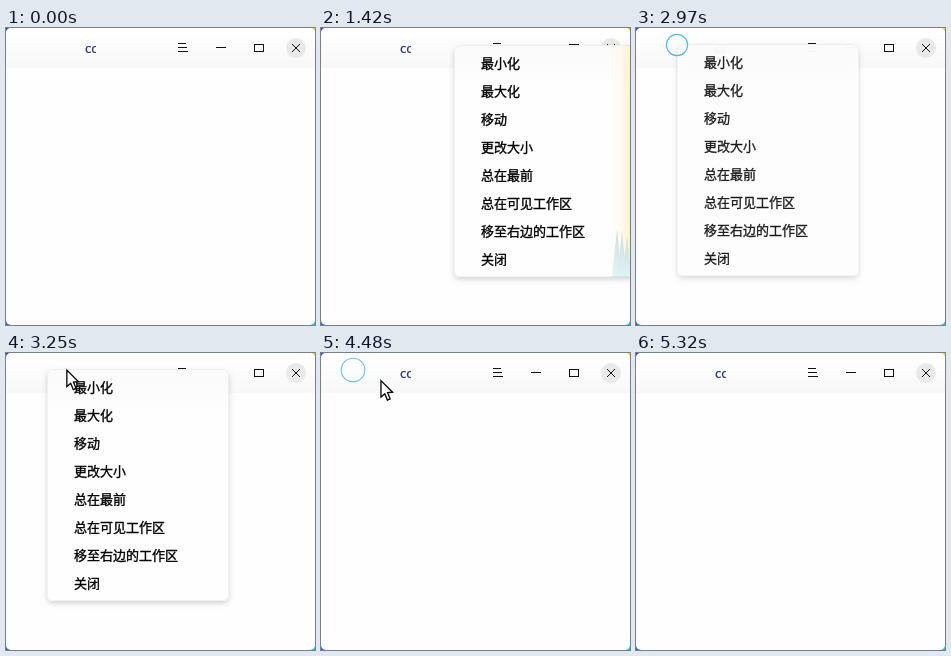
An HTML page with a canvas that plays this animation: 309x297 px, repeating every 6.52 s.

```html
<!DOCTYPE html>
<html lang="zh-CN">
<head>
<meta charset="utf-8">
<title>Window menu</title>
<style>
html, body { margin: 0; width: 100%; height: 100%; overflow: hidden; background: #fff; }
canvas { display: block; width: 309px; height: 297px; }
</style>
</head>
<body>
<canvas id="stage" width="309" height="297"></canvas>
<script>
const W = 309, H = 297, LOOP = 6520;
const BAR = 40, ROW = 28;
const FADE = 200;
const g = document.getElementById('stage').getContext('2d');
const ITEMS = ['最小化', '最大化', '移动', '更改大小', '总在最前', '总在可见工作区', '移至右边的工作区', '关闭'];

// Each tap sends out a ring; one opens the menu, the next closes it.
const tap = (x, time, life) => ({ x, y: 17, time, life });
const SHOWS = [
  { x: 133, y: 17, open: tap(133, 1090, 330), close: tap(115, 1860, 380) },
  { x: 41, y: 16, open: tap(41, 2800, 360), close: tap(32, 4030, 690) }
];

// Key places of the pointer tip
const at = (time, x, y) => ({ time, x, y });
const PATH = [
  at(3130, 78, 17.5), at(3720, 31.5, 16.5), at(4240, 31.5, 16.5), at(4480, 59.5, 27.5),
  at(4880, 155, 55), at(5120, 155, 55), at(5320, 290, 233)
];

const mix = (a, b, p) => a + (b - a) * p;
const span = (t, a, b) => Math.max(0, Math.min(1, (t - a) / (b - a)));
const easeOut = (p, n = 2) => 1 - (1 - p) ** n;

function fade(x0, y0, x1, y1, ...stops) {
  const f = g.createLinearGradient(x0, y0, x1, y1);
  stops.forEach((c, i) => f.addColorStop(i / (stops.length - 1), c));
  return f;
}

function fillRect(x, y, w, h, color) {
  g.fillStyle = color;
  g.fillRect(x, y, w, h);
}

function box(x, y, w, h, r) {
  g.beginPath();
  g.roundRect(x, y, w, h, r);
}

function circle(x, y, r) {
  g.beginPath();
  g.arc(x, y, r, 0, 2 * Math.PI);
}

// A thin stroke gives the text its medium weight.
function label(text, x, y, color, weight) {
  g.fillStyle = g.strokeStyle = color;
  g.lineWidth = weight;
  g.fillText(text, x, y);
  g.strokeText(text, x, y);
}

function drawDesktop() {
  fillRect(0, 0, W / 2, H, fade(0, 0, 0, H, '#3c4cae', '#2f6fc8'));
  fillRect(W / 2, 0, W / 2, H, fade(0, 0, 0, H, '#f2d81c', '#30c0c4'));
}

function drawIcons() {
  const cy = 20, arm = 4;
  fillRect(210, cy - 1, 10, 1, '#111');
  for (let i = 0; i < 3; i++) fillRect(172, cy - 5 + i * 4, 8 + i, 1, '#111');

  g.fillStyle = '#e9e9e9';
  circle(290, cy, 10);
  g.fill();

  g.strokeStyle = '#111';
  g.lineWidth = 1;
  g.strokeRect(248.5, cy - 3.5, 9, 7);
  g.beginPath();
  for (const s of [-1, 1]) {
    g.moveTo(290 - arm, cy - arm * s);
    g.lineTo(290 + arm, cy + arm * s);
  }
  g.stroke();
}

function drawWindow() {
  g.save();
  box(0, 0, W, H, 5);
  g.clip();
  fillRect(0, 0, W, H, '#fefefe');
  fillRect(0, 0, W, BAR, fade(0, 0, 0, BAR, '#ffffff', '#f8f8f8'));
  g.beginPath();
  g.rect(78, 0, 12, BAR);
  g.clip();
  g.font = '13px "Noto Sans", sans-serif';
  label('co', 79, 25, '#28346c', .2);
  g.restore();
  drawIcons();
}

// Blurred wallpaper showing through past the window edge
function drawGlow(bottom) {
  const shore = 206, left = 288;
  fillRect(left, 0, W - left, bottom,
    fade(left, 0, W, 0, 'rgba(255,246,214,0)', 'rgba(254,247,222,.35)', 'rgba(255,240,192,.85)'));
  for (let x = 294; x < W; x += 5) {
    const peak = shore + 5 * Math.sin(x);
    g.fillStyle = fade(0, peak, 0, bottom, 'rgba(196,214,220,.75)', 'rgba(220,244,246,.9)');
    g.beginPath();
    g.moveTo(x - 3, bottom);
    g.lineTo(x + 2, peak);
    g.lineTo(x + 7, bottom);
    g.fill();
  }
}

function drawMenu({ x, y, open, close }, t) {
  const start = open.time + 50, end = close.time + 60;
  const alpha = easeOut(span(t, start, start + FADE)) * (1 - span(t, end, end + FADE));
  if (!alpha) return;
  const w = 182, h = ITEMS.length * ROW + 8;
  g.save();
  g.globalAlpha = alpha;

  g.save();
  g.shadowColor = 'rgba(0,0,0,.16)';
  g.shadowBlur = 5;
  g.shadowOffsetY = 2.5;
  g.fillStyle = '#fff';
  box(x, y, w, h, 6);
  g.fill();
  g.restore();

  g.save();
  box(x, y, w, h, 6);
  g.clip();
  fillRect(x, y, w, h, fade(0, y, 0, y + BAR, '#fafafa', '#fefefe'));
  if (x + w > W) drawGlow(y + h);
  g.restore();

  g.strokeStyle = 'rgba(0,0,0,.05)';
  g.lineWidth = 1;
  box(x + .5, y + .5, w - 1, h - 1, 6);
  g.stroke();

  g.font = '500 13px "Noto Sans CJK SC", "Noto Sans CJK", sans-serif';
  ITEMS.forEach((s, i) => label(s, x + 27, y + 23 + i * ROW, '#000', .35));
  g.restore();
}

function drawRing({ x, y, time, life }, t) {
  const p = (t - time) / life;
  if (p < 0 || p >= 1) return;
  const grow = easeOut(p, 3);
  g.save();
  g.globalAlpha = 1 - .45 * p;
  g.strokeStyle = `rgb(40,${mix(195, 165, grow)},${mix(200, 215, grow)})`;
  g.lineWidth = mix(2, 1, grow);
  circle(x, y, mix(.5, 12.3, grow));
  g.stroke();
  g.restore();
}

function drawPointer(t) {
  const i = PATH.findIndex(k => t < k.time);
  if (i < 1) return;
  const a = PATH[i - 1], b = PATH[i], p = easeOut(span(t, a.time, b.time));
  const side = [[6.3, 15.2], [1.5, 13.6], [1.5, 20.4]];
  const mirror = side.map(([x, y]) => [-x, y]).reverse();
  g.save();
  g.translate(mix(a.x, b.x, p), mix(a.y, b.y, p));
  g.rotate(-Math.PI / 8);
  g.beginPath();
  g.moveTo(0, 0);
  for (const [x, y] of [...side, ...mirror]) g.lineTo(x, y);
  g.closePath();
  g.fillStyle = '#fff';
  g.fill();
  g.strokeStyle = '#000';
  g.lineWidth = 1.3;
  g.stroke();
  g.restore();
}

function draw(t) {
  drawDesktop();
  drawWindow();
  for (const show of SHOWS) {
    drawMenu(show, t);
    drawRing(show.open, t);
    drawRing(show.close, t);
  }
  drawPointer(t);
}

const start = performance.now();
function tick() {
  draw((performance.now() - start) % LOOP);
  requestAnimationFrame(tick);
}
tick();
</script>
</body>
</html>
```
